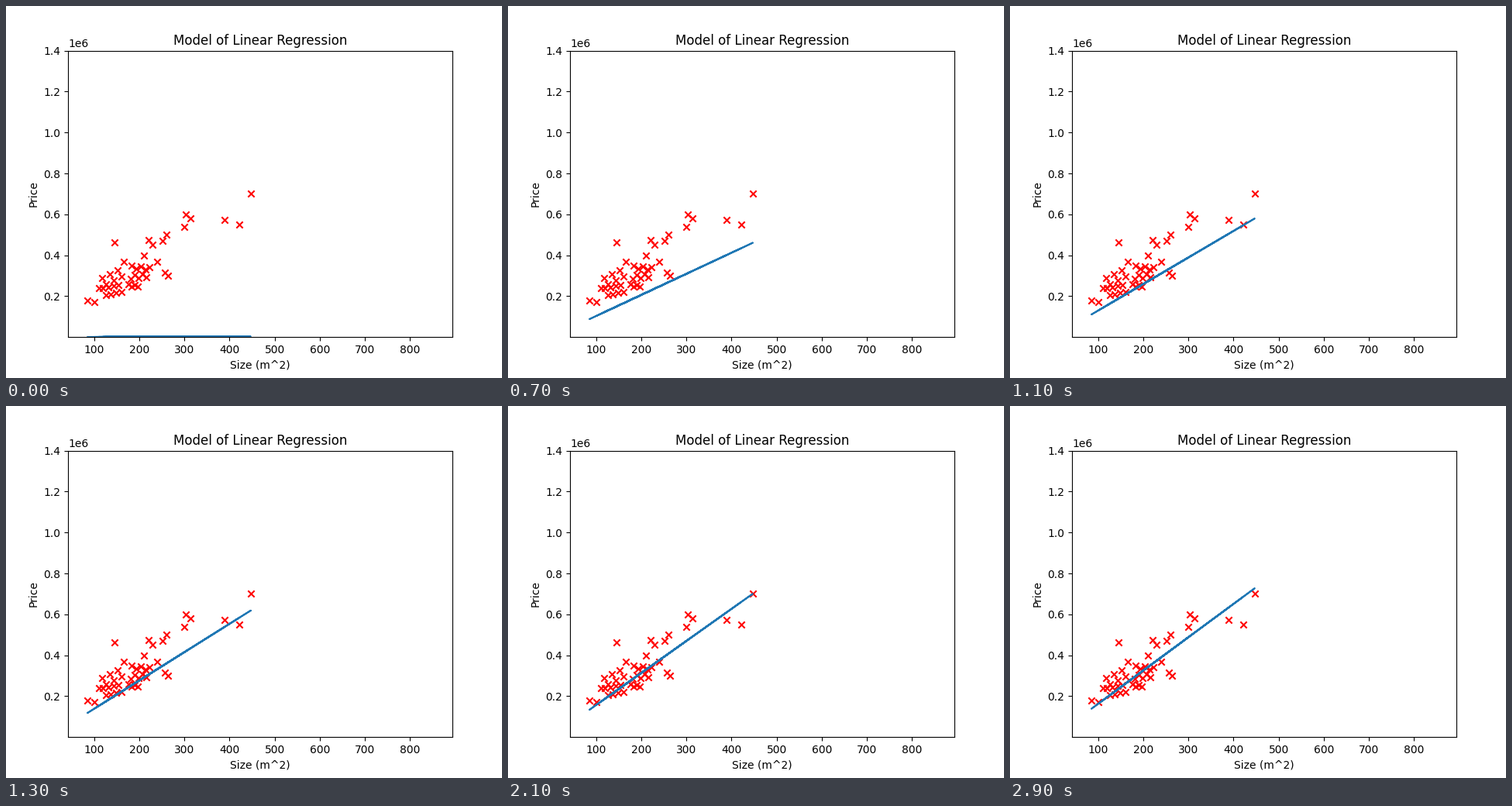
Recreate the animation shown at these times as a matplotlib script. Size 640 px wide and 480 px high, loop 3000 ms.

```python
import numpy as np
import matplotlib.pyplot as plt
from matplotlib.animation import FuncAnimation

FRAMES = 30
INTERVAL = 100
STEPS_PER_FRAME = 30
BEST_SLOPE = 1657
SHRINK = 0.0046  # share of the remaining error removed per descent step

# Isolated houses: size in m^2, price in thousands.
LONERS = [(85, 180), (100, 170), (145, 464.5), (166, 368.5), (210, 400),
          (220, 475), (230, 450), (240, 369), (252, 469), (256, 314),
          (260, 500), (263, 300), (300, 540), (303, 599), (313, 580),
          (389, 574), (421, 549), (447, 700)]


def band(count, sizes, prices, swing):
    """Evenly spaced houses whose prices zigzag around a straight trend."""
    zigzag = swing * (-1.0) ** np.arange(count)
    return np.column_stack([np.linspace(*sizes, count),
                            np.linspace(*prices, count) + zigzag])


houses = np.vstack([
    LONERS,
    band(8, (120, 160), (220, 240), 18),
    band(7, (110, 160), (260, 315), -20),
    band(4, (176, 196), (254, 250), 4),
    band(5, (181, 216), (292, 300), -9),
    band(5, (183, 223), (344, 335), 6),
])
# The line visits the houses in no particular order.
size, price = np.random.default_rng(1).permutation(houses).T
price = price * 1000


def slope(frame):
    """Slope reached by gradient descent from zero, in closed form."""
    steps = STEPS_PER_FRAME * frame + 1
    return BEST_SLOPE * (1 - (1 - SHRINK) ** steps)


fig, ax = plt.subplots(figsize=(6.4, 4.8), dpi=100)
ax.set_title("Model of Linear Regression", pad=5.3)
ax.set_xlabel("Size (m^2)")
ax.set_ylabel("Price")
ax.set_xlim(size.min() // 2, size.max() * 2)
ax.set_ylim(1, price.max() * 2)
ax.scatter(size, price, color="red", marker="x")
line, = ax.plot(size, slope(0) * size)


def update(frame):
    line.set_ydata(slope(frame) * size)
    return line,


anim = FuncAnimation(fig, update, frames=FRAMES, interval=INTERVAL,
                     repeat=True, repeat_delay=0)
plt.show()
```
